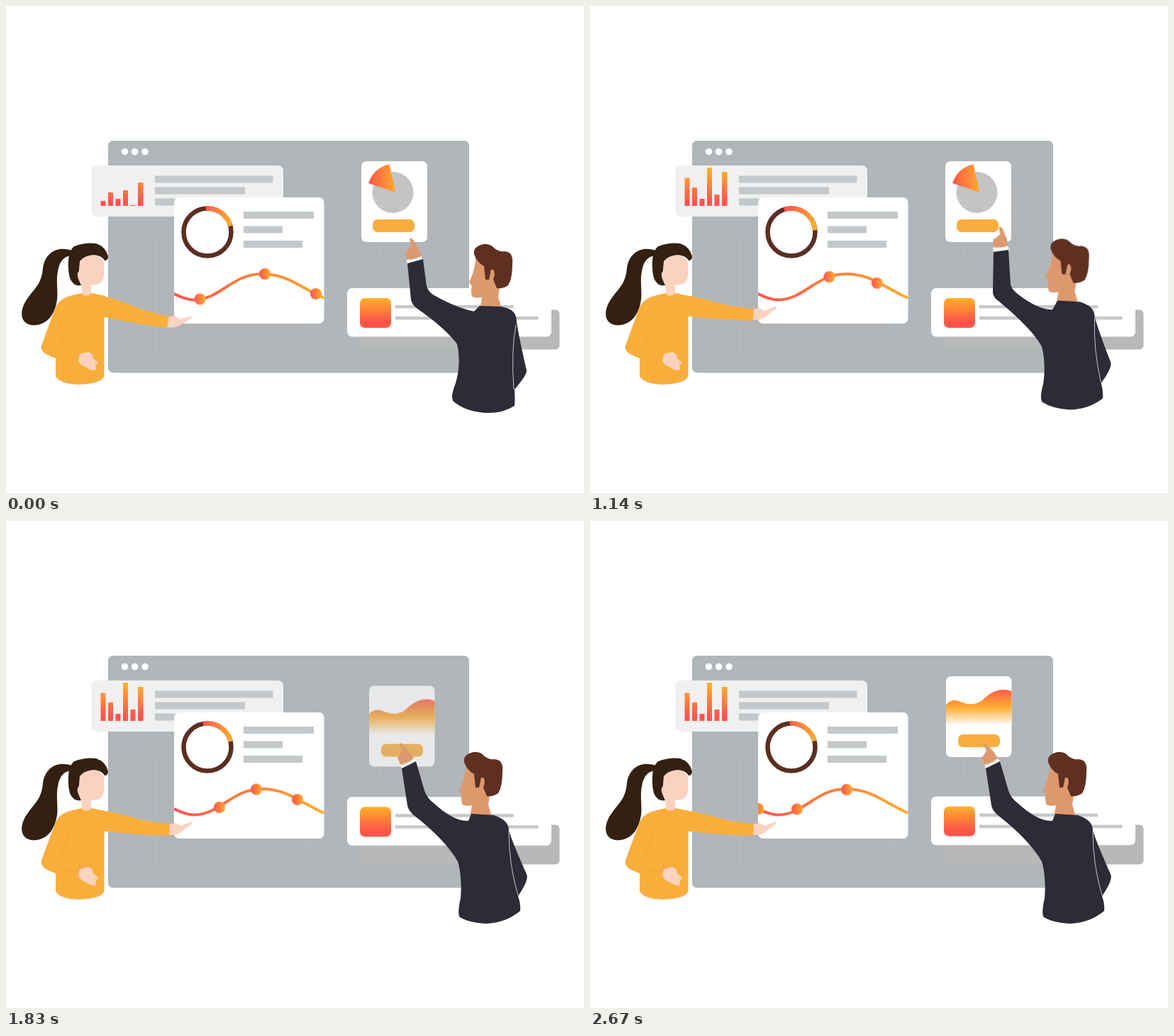
Write an HTML page that moves like this. It is 815 px wide and 687 px high and loops after 2700 ms.

```html
<!DOCTYPE html>
<html lang="en">
<head>
<meta charset="utf-8">
<title>Dashboard team</title>
<style>
html, body { margin: 0; width: 100%; height: 100%; overflow: hidden; background: #fff; }
svg { display: block; width: 815px; height: 687px; }
.anim, .bars rect, .dots circle { animation: 2.7s linear infinite; }
.line { fill: #c3c8cb; }
.skin { fill: #dc996e; }
.suit { fill: #2d2b36; }
.pale { fill: #f9d2c0; }
.shirt { fill: #f9ae3c; }

/* floating list card */
.list { animation-name: bob; animation-timing-function: cubic-bezier(.37, 0, .63, 1); }
@keyframes bob {
  0%, 42.2%, 83.3% { transform: translateY(0); }
  21.1%, 61.1% { transform: translateY(-11px); }
  100% { transform: translateY(-9.5px); }
}

/* bar chart */
.bars rect { transform-origin: 0 282px; }
.bars rect:nth-child(1) { animation-name: bar1; }
.bars rect:nth-child(2) { animation-name: bar2; }
.bars rect:nth-child(4) { animation-name: bar4; }
.bars rect:nth-child(5) { animation-name: bar5; }
.bars rect:nth-child(6) { animation-name: bar6; }
@keyframes bar1 { 0% { y: 275px; height: 7px; } 14.4% { y: 268px; height: 14px; } 25%, 100% { y: 242.5px; height: 39.5px; } }
@keyframes bar2 { 0% { y: 263px; height: 19px; } 14.4% { y: 255px; height: 27px; } 25%, 100% { y: 256px; height: 26px; } }
@keyframes bar4 { 0% { y: 260px; height: 22px; } 14.4% { y: 252px; height: 30px; } 25%, 100% { y: 228px; height: 54px; } }
@keyframes bar5 { 0% { y: 281px; height: 1px; } 14.4% { y: 252px; height: 30px; } 25%, 100% { y: 266px; height: 16px; } }
@keyframes bar6 { 0% { y: 249px; height: 33px; } 14.4% { y: 253px; height: 29px; } 25%, 100% { y: 234px; height: 48px; } }

/* main chart card */
.press { animation-name: press; transform-origin: 418px 338px; }
@keyframes press {
  0%, 7%, 22%, 100% { transform: scale(1); opacity: 1; }
  14.4% { transform: scale(.976); opacity: .88; }
}
.arc { animation-name: arc; }
@keyframes arc {
  0%, 36%, 69.5%, 100% { stroke-dasharray: 79 281; stroke-dashoffset: 94; }
  42.2% { stroke-dasharray: 103 257; stroke-dashoffset: 108; }
  58.9% { stroke-dasharray: 166 194; stroke-dashoffset: 136; }
  67.8% { stroke-dasharray: 87 273; stroke-dashoffset: 101; }
}
.dots circle:nth-child(1) { animation-name: dot1; }
.dots circle:nth-child(2) { animation-name: dot2; }
.dots circle:nth-child(3) { animation-name: dot3; }
.dots circle:nth-child(4) { animation-name: dot4; }
@keyframes dot1 {
  0%, 26% { transform: translate(273.5px, 413.5px); }
  30% { transform: translate(260px, 414px); }
  36% { transform: translate(237px, 406px); }
  41%, 100% { transform: translate(215px, 398px); }
}
@keyframes dot2 {
  0%, 26% { transform: translate(365px, 378px); }
  34% { transform: translate(350px, 379px); }
  42.2% { transform: translate(337.5px, 382px); }
  58.9% { transform: translate(313px, 394.5px); }
  67.8% { transform: translate(301px, 404px); }
  76% { transform: translate(284px, 411.5px); }
  84.4% { transform: translate(267px, 414.5px); }
  98.9% { transform: translate(237.5px, 406px); }
  100% { transform: translate(235px, 405px); }
}
@keyframes dot3 {
  0%, 26% { transform: translate(437px, 406px); }
  42.2% { transform: translate(405px, 391px); }
  58.9% { transform: translate(372px, 379px); }
  67.8% { transform: translate(353px, 378.5px); }
  84.4% { transform: translate(319px, 391px); }
  92% { transform: translate(305px, 400px); }
  98.9%, 100% { transform: translate(292px, 406.5px); }
}
@keyframes dot4 {
  0%, 45% { transform: translate(466px, 419px); }
  58.9% { transform: translate(429px, 401.5px); }
  67.8% { transform: translate(411px, 393px); }
  84.4% { transform: translate(381px, 381.5px); }
  98.9%, 100% { transform: translate(362px, 379px); }
}

/* pie card drops out, area card takes its place */
.pie { animation-name: drop; transform-origin: 547.5px 276px; }
@keyframes drop {
  0%, 54.5% { transform: none; opacity: 1; }
  58.9% { transform: translate(7.5px, 44.5px) scale(.95); opacity: .95; }
  61.5% { transform: translate(18px, 130px) scale(.88); opacity: .5; }
  64.4%, 100% { transform: translate(40px, 313px) scale(.8); opacity: 0; }
}
.pie .tap { animation-name: fade; }
@keyframes fade { 0%, 55% { opacity: 1; } 58.9% { opacity: .27; } 60%, 100% { opacity: 0; } }
.area { animation-name: rise; }
@keyframes rise {
  0%, 63.5% { transform: translate(22px, 42px); opacity: 0; }
  67.8% { transform: translate(10px, 13.5px); opacity: .7; }
  72%, 100% { transform: none; opacity: 1; }
}

/* people */
.reach { animation-name: reach; transform-origin: 130px 422px; }
@keyframes reach { 0% { transform: rotate(6deg); } 11%, 100% { transform: rotate(0); } }
.head { animation-name: head; }
@keyframes head { 0%, 22% { transform: none; } 49%, 100% { transform: translate(-14px, -10px); } }
.hand { animation-name: hand; transform-origin: 576px 358px; }
@keyframes hand {
  0%, 22% { transform: none; }
  40%, 43% { transform: translate(3.5px, -16px) rotate(8deg); }
  54%, 100% { transform: translate(-9px, -16px) rotate(-12deg); }
}
.torso { animation-name: torso; }
@keyframes torso {
  0%, 22% { d: path("M668 423L698 424C712 427 720 431 720 446C724 470 729 492 734 514Q735 520 717 541Q718 556 717 564Q700 575 676 574Q648 572 631 558Q626 552 634 532C641 510 640 482 632 466C640 450 655 435 668 423Z"); }
  49%, 100% { d: path("M656 413L688 415C702 420 709 426 709 437C717 460 726 480 734 498Q738 506 722 529Q726 540 725 550Q705 567 676 568Q654 567 640 559Q636 554 641 532C643 510 641 482 630 462C640 447 650 430 656 413Z"); }
}
.seam { animation-name: seam; }
@keyframes seam {
  0%, 22% { d: path("M719 450Q712 485 716 541"); }
  49%, 100% { d: path("M709 437Q709 485 722 528"); }
}
.arm { animation-name: arm; }
@keyframes arm {
  0%, 22% { d: path("M566 363L588 357L593 395Q596 405 607 410Q640 428 666 432L690 460L640 482Q622 456 580 427Q572 421 571 414Z"); }
  40%, 43% { d: path("M569 347L590 344L593 393Q595 400 604 407Q638 433 658 427L680 460L638 482Q624 456 577 417Q568 411 568 404Z"); }
  54%, 100% { d: path("M558 349L578 339L590 380Q593 390 603 398Q636 428 657 422L680 460L638 482Q620 450 575 415Q567 408 566 401Z"); }
}
</style>
</head>
<body>
<svg viewBox="0 0 815 687">
  <defs>
    <linearGradient id="barFill" gradientUnits="userSpaceOnUse" x1="0" y1="228" x2="0" y2="276">
      <stop stop-color="#fdb42a"/><stop offset=".5" stop-color="#ff853b"/><stop offset="1" stop-color="#ff534c"/>
    </linearGradient>
    <linearGradient id="across"><stop stop-color="#ff554c"/><stop offset="1" stop-color="#fcab2e"/></linearGradient>
    <linearGradient id="arcFill" gradientUnits="userSpaceOnUse" x1="272" y1="0" x2="316" y2="0">
      <stop stop-color="#ff4750"/><stop offset="1" stop-color="#fcab2c"/>
    </linearGradient>
    <linearGradient id="down" x2="0" y2="1"><stop stop-color="#fdb02b"/><stop offset=".8" stop-color="#ff5549"/></linearGradient>
    <linearGradient id="areaFill" x2="0" y2="1">
      <stop stop-color="#ff5c47"/><stop offset=".5" stop-color="#fcae30"/><stop offset="1" stop-color="#fff"/>
    </linearGradient>
    <clipPath id="chart"><rect x="237" y="270" width="211.5" height="178" rx="7"/></clipPath>
  </defs>

  <!-- window -->
  <rect x="144" y="190" width="509" height="327.5" rx="7" fill="#b0b6ba"/>
  <g fill="#fff"><circle cx="167.5" cy="205.5" r="4.8"/><circle cx="181.5" cy="205.5" r="4.8"/><circle cx="196" cy="205.5" r="4.8"/></g>
  <g fill="#b3b4b5" fill-opacity=".4" stroke="#bcc0c2" stroke-width=".7">
    <path d="M211 328V489Q211 495 217 495H416Q422 495 422 489V328"/>
    <path d="M527 251V358Q527 364 533 364H616V251"/>
  </g>
  <rect x="498" y="428.5" width="282.5" height="56" rx="6" fill="#b7b8b8"/>

  <!-- bar card -->
  <rect x="120.500" y="225" width="270.500" height="72" rx="7" fill="#f0f0f0"/>
  <g class="bars" fill="url(#barFill)">
    <rect x="133.500" y="242.500" width="7" height="39.500"/>
    <rect x="144" y="256" width="7" height="26"/>
    <rect x="154.500" y="272" width="7" height="10"/>
    <rect x="165" y="228" width="7" height="54"/>
    <rect x="175.500" y="266" width="7" height="16"/>
    <rect x="186" y="234" width="7.500" height="48"/>
  </g>
  <path class="line" d="M210 239.500h166.500v10H210zM210 255.500h127v10H210zM210 271.500h70v10H210z"/>

  <!-- main chart card -->
  <g class="anim press">
    <rect x="237" y="270" width="211.500" height="178" rx="7" fill="#fff"/>
    <g fill="none" stroke-width="6.500">
      <circle cx="284" cy="319" r="33.500" stroke="#5c2e22"/>
      <circle class="anim arc" cx="284" cy="319" r="33.500" pathLength="360" stroke="url(#arcFill)" stroke-dasharray="79 281" stroke-dashoffset="94"/>
    </g>
    <path class="line" d="M335 290h99v10H335zM335 310.500h55v10H335zM335 331h83v10H335z"/>
    <g clip-path="url(#chart)">
      <path d="M237 406C247 411 256 414.500 265 414.500C303 414 318 378 361 378C395 378 412 395 448.500 412" fill="none" stroke="url(#across)" stroke-width="4"/>
      <g class="dots" fill="url(#across)"><circle r="8"/><circle r="8"/><circle r="8"/><circle r="8"/></g>
    </g>
  </g>

  <!-- list card -->
  <g class="anim list">
    <rect x="481" y="398" width="288" height="68.500" rx="7" fill="#fff"/>
    <rect x="499" y="412" width="44" height="42" rx="7" fill="url(#down)"/>
    <path class="line" d="M549 422h167v4.500H549zM549 438h201.500v4.500H549z"/>
  </g>

  <!-- swapping cards -->
  <g class="anim pie">
    <rect x="501" y="219" width="93" height="114" rx="7" fill="#fff"/>
    <circle cx="545.500" cy="263" r="29" fill="#c4c4c4"/>
    <path d="M549.500 263L511 250Q518 229 540.500 223Z" fill="url(#across)"/>
    <rect class="anim tap" x="517" y="301" width="59" height="18" rx="7" fill="#f9ad3d"/>
  </g>
  <g class="anim area">
    <rect x="502" y="219" width="92.500" height="114" rx="7" fill="#fff"/>
    <path d="M502 259Q511 249 525 256Q541 262 553 253C564 242 577 234 594.500 240V288H502Z" fill="url(#areaFill)"/>
    <rect x="519" y="301" width="59" height="18" rx="7" fill="#f9ad3d"/>
  </g>

  <!-- woman -->
  <path fill="#332010" d="M95 346C74 337 55 347 52 370C50 392 42 396 30 413C18 430 20 447 35 450C52 452 66 442 71 420C75 404 69 388 74 370C78 355 86 352 95 352Z"/>
  <path class="shirt" d="M107 405L94 408Q75 412 69 427L50 479Q48 487 58 492L70 497V522Q75 533 102 534Q135 533 138.500 522V437L140 409L120 405Q113 410 107 405Z"/>
  <path d="M90 438L78 472L105 485L100 496L72 489" fill="none" stroke="#eda034" stroke-width=".8"/>
  <path class="pale" d="M104 361Q110 351 124 351Q134 352 138 361V380Q137 392 128 393L120 394V406Q113 412 107 406L106 392L101 384Q99 374 104 374Z"/>
  <path fill="#332010" d="M88 360Q88 346 96 339Q112 333 127 335Q140 339 144 353Q144 359 139 359Q135 352 124 351Q110 352 104 360L103 374Q99 377 102 385L106 394Q95 396 90 384Q87 372 88 360Z"/>
  <path class="pale" d="M104 491L116 488Q125 492 122 496L130 503Q130 507 126 505L127 513Q122 516 114 510Q104 507 102 500Z"/>
  <g class="anim reach">
    <path class="shirt" d="M120 406L140 409Q160 412 185 420Q205 425 231 427.500L230 444Q185 443 132 437Z"/>
    <path class="pale" d="M231 427.500L240 426L246 430L261 424Q265 424 261 428L249 437Q244 443 230 443Z"/>
  </g>

  <!-- man -->
  <g class="anim hand">
    <path class="skin" d="M569 329Q572 326 576 333L582 343L586 355L566 360L563 347Q567 345 572 338Z"/>
    <path fill="#fff" stroke="#e4e4e6" stroke-width=".5" d="M565 358Q577 358 585 353L588 359L566 364Z"/>
  </g>
  <g class="anim head">
    <path class="skin" d="M663 350L686 352L697 392L694 410L698 424Q684 430 669 423L671 411Q660 413 657 409Q655 401 657 396L653 389Q661 376 663 350Z"/>
    <path fill="#5f3021" d="M660 350Q659 341 667 338Q680 332 689 342Q695 347 703 346Q716 347 714 364Q714 385 708 394Q702 399 692 398L687 386Q691 376 687 372Q683 371 683 377L681 386H676L674 367Q664 362 660 350Z"/>
  </g>
  <path class="anim suit torso"/>
  <path class="anim suit arm"/>
  <path class="anim seam" fill="none" stroke="#c4c4c9"/>
</svg>
</body>
</html>
```
